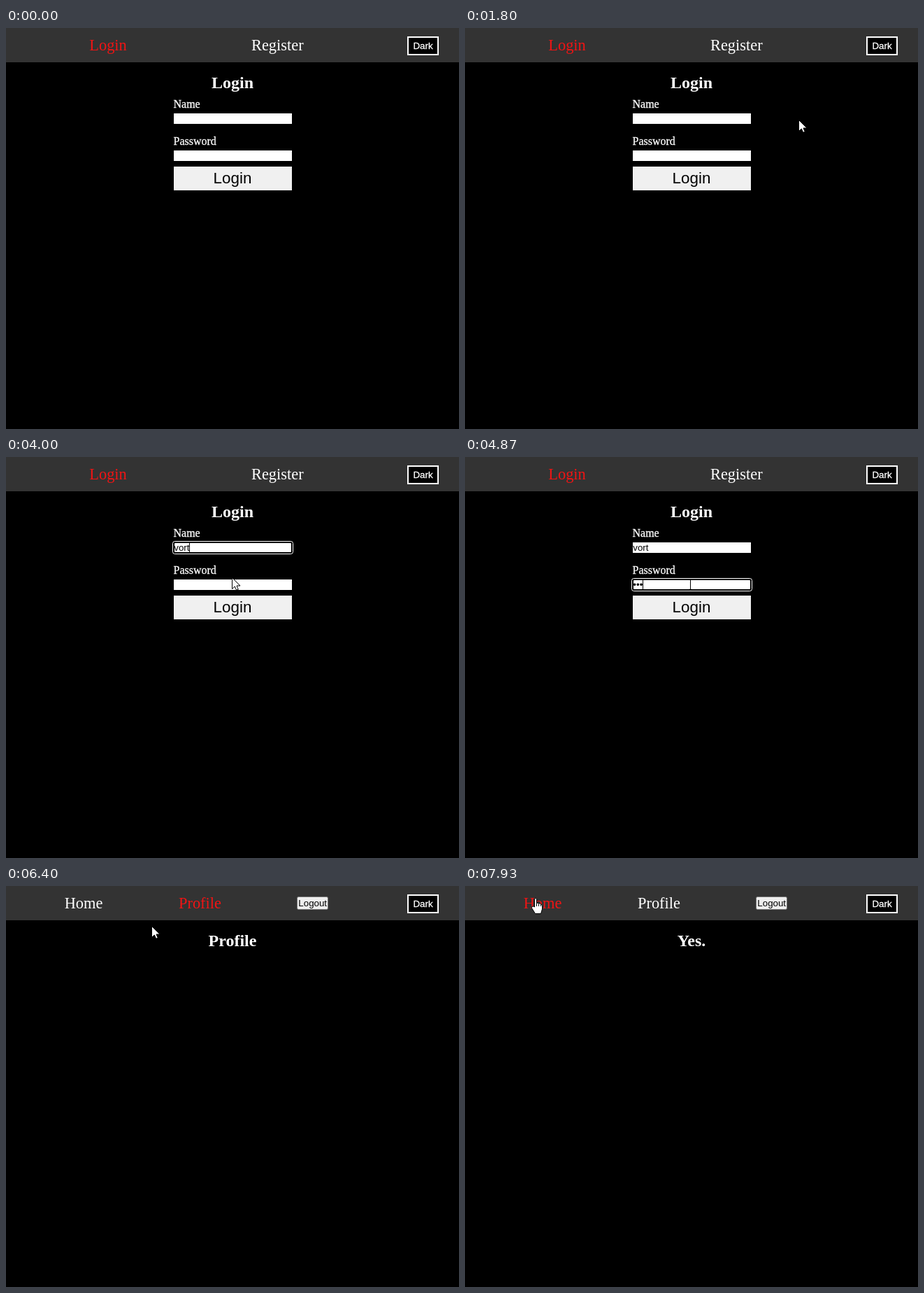
These frames come from a looping animation (648 px wide and 573 px high, 8000 ms). An HTML page:

```html
<!DOCTYPE html>
<html lang="en">
<head>
<meta charset="utf-8">
<title>Login demo</title>
<style>
  html, body { margin: 0; width: 100%; height: 100%; overflow: hidden; background: #000; }
  svg { display: block; }
  text { fill: #fff; font: 16px "Liberation Serif", serif; white-space: pre; }
  .link { font-size: 22.4px; }
  .link.active { fill: #f11414; }
  .title { font-size: 24px; font-weight: bold; text-anchor: middle; }
  .ui { font: 13.333px "Liberation Sans", sans-serif; }
  .mid { text-anchor: middle; }
  .crisp { stroke: #fff; stroke-width: .3px; }
  .dark { fill: #000; }
</style>
</head>
<body>
<svg width="648" height="573" viewBox="0 0 648 573">
  <rect width="648" height="573"/>
  <rect width="648" height="49" fill="#333"/>
  <rect x="575" y="13" width="43" height="25" stroke="#fff" stroke-width="2"/>
  <text class="ui mid crisp" x="596.5" y="30">Dark</text>
  <text class="title" id="title" x="324" y="86"></text>

  <g id="guest">
    <text class="link active" x="119.3" y="32">Login</text>
    <text class="link" x="351" y="32">Register</text>
    <text class="crisp" x="239.5" y="114">Name</text>
    <text class="crisp" x="239.5" y="167">Password</text>
    <path d="M240 122h169v15h-169zM240 175h169v15h-169z" fill="#fff"/>
    <g id="ring">
      <rect x="238.5" y="120.5" width="172" height="18" rx="3" stroke="#fff"/>
      <rect x="241" y="123" width="167" height="13" rx="1" fill="#fff"/>
    </g>
    <text class="ui dark" id="name" x="240.3" y="134"></text>
    <text class="ui dark" id="password" x="240.3" y="187"></text>
    <rect id="caret" width="1" height="14"/>
    <rect x="240" y="198" width="169" height="34" fill="#f0f0f0"/>
    <text class="ui dark mid" x="324" y="222" style="font-size:22.4px">Login</text>
  </g>

  <g id="member">
    <text class="link" id="home" x="83.7" y="32">Home</text>
    <text class="link" id="profile" x="247" y="32">Profile</text>
    <rect x="416.5" y="15.5" width="44" height="18" rx="2" fill="#efefef" stroke="#767676"/>
    <text class="ui dark mid" x="438.7" y="29">Logout</text>
  </g>

  <g id="pointer" fill="#fff" stroke="#000">
    <path id="arrow" d="M.5 .5V16.5L4.3 13 6.7 18.3 9.3 17.2 7 12H12z"/>
    <path id="beam" fill="none" d="M-3 -7.5H-1L.5 -6.5 2 -7.5H4M.5 -6.5V6.5M-3 7.5H-1L.5 6.5 2 7.5H4"/>
    <path id="hand" d="M-1.5 13V1.5Q0 -.5 1.5 1.5V7.5Q3 6.5 4.5 8 6 7 7.5 9 9.5 8.5 9.5 11V16L7.5 22.5H-.5L-5.5 14.5Q-6 12 -3.5 12zM1.5 7.5V12M4.5 8V12M7.5 9V12"/>
  </g>
</svg>
<script>
const LOOP = 8000, STEP = 200 / 3;
const $ = id => document.getElementById(id);
const show = (id, on) => $(id).style.display = on ? '' : 'none';

const onHome = [101, 17], onProfile = [276, 25];

// The pointer rests between moves: start, end, target, downward bend
const moves = [
  [1930, 2070, [341, 112]],
  [2070, 2330, [340, 139]],
  [2470, 2870, [343, 132]],
  [3200, 3270, [336, 148]],
  [3600, 4000, [323, 172]],
  [4130, 4400, [322, 182]],
  [5000, 5270, [315, 219]],
  [5470, 5670, onProfile],
  [6070, 6600, onHome, 37],
  [6800, 7000, onProfile],
  [7270, 7870, onHome]
];

// Swing in from below, then circle the form
function sweep(t) {
  if (t < 1200) {
    const u = (t - 400) / 800;
    return [29 + 98 * u + 293 * Math.sin(Math.PI * u), 531 - 353 * u];
  }
  const angle = Math.PI + 4.39 * Math.min(1, (t - 1200) / 730);
  return [312 + 185 * Math.cos(angle), 178 - 104 * Math.sin(angle)];
}

function pointerAt(t) {
  let [x, y] = sweep(t);
  for (const [start, end, [toX, toY], bend = 0] of moves) {
    if (t < start) break;
    const u = Math.min(1, (t - start) / (end - start)) ** 2;
    x += (toX - x) * u;
    y += (toY - y) * u + bend * Math.sin(Math.PI * u);
  }
  return [Math.round(x), Math.round(y)];
}

function isOver(id, x, y) {
  const b = $(id).getBBox();
  return x >= b.x && x < b.x + b.width && y >= b.y && y < b.y + b.height;
}

function drawPointer(t, guest) {
  show('pointer', t >= 400);
  if (t < 400) return;
  const [x, y] = pointerAt(t);
  const overField = top => x >= 240 && x < 409 && y >= top && y < top + 15;
  const beam = guest && (overField(122) || overField(175));
  const hand = !guest && (isOver('home', x, y) || isOver('profile', x, y));
  show('beam', beam);
  show('hand', hand);
  show('arrow', !beam && !hand);
  $('pointer').setAttribute('transform', `translate(${x} ${y})`);
}

const typed = (text, elapsed, pause) =>
  text.slice(0, Math.max(0, Math.floor(elapsed / pause) + 1));

function drawForm(t) {
  $('name').textContent = typed('vort', t - 3470, 133);
  $('password').textContent = typed('••••', t - 4400, 170);
  const second = t >= 4200;
  const field = $(second ? 'password' : 'name');
  const offset = second ? 53 : 0;
  show('ring', t >= 3270);
  show('caret', t >= 3270);
  $('ring').setAttribute('transform', `translate(0 ${offset})`);
  $('caret').setAttribute('x', Math.max(241, Math.floor(240.3 + field.getComputedTextLength())));
  $('caret').setAttribute('y', 123 + offset);
}

function draw(now) {
  // Screen updates 15 times a second
  const t = Math.round(Math.floor((now % LOOP + 4) / STEP) * STEP / 10) * 10 % LOOP;
  const guest = t < 5270;
  const again = t >= 7070 && t < 7930;
  const profileLink = t >= 5730 && t < 6600 || again;
  const profilePage = t >= 6130 && t < 6600 || again;
  show('guest', guest);
  show('member', !guest);
  $('title').textContent = guest ? 'Login' : profilePage ? 'Profile' : 'Yes.';
  $('home').classList.toggle('active', !profileLink);
  $('profile').classList.toggle('active', profileLink);
  if (guest) drawForm(t);
  drawPointer(t, guest);
}

const start = performance.now();
function tick() {
  draw(performance.now() - start);
  requestAnimationFrame(tick);
}
tick();
</script>
</body>
</html>
```
